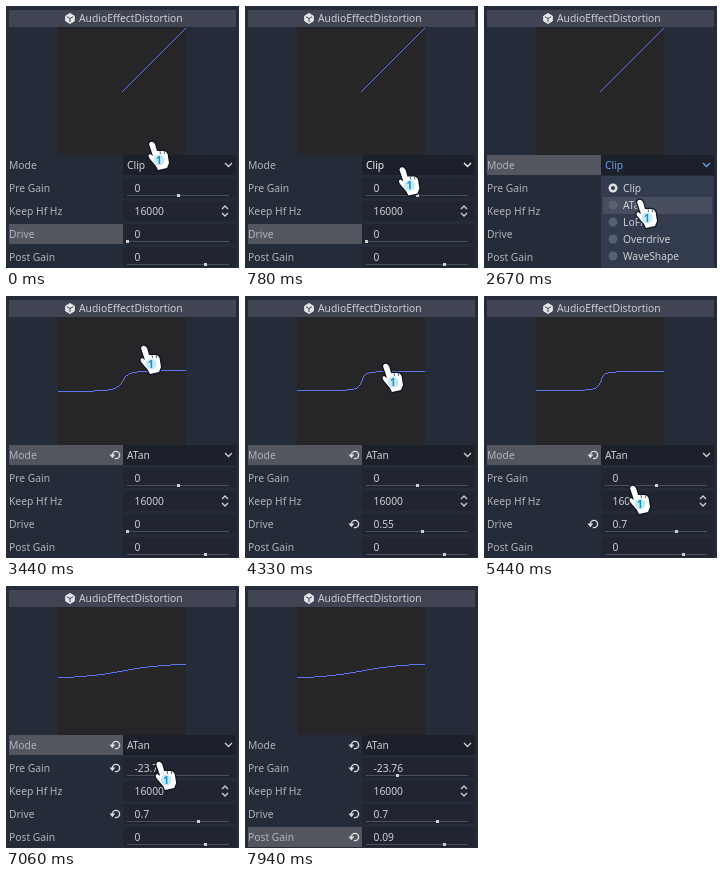
Write an HTML page with a canvas that moves like this. It is 233 px wide and 262 px high and loops after 8 s.

```html
<!DOCTYPE html>
<html lang="en">
<head>
<meta charset="utf-8">
<title>Distortion inspector</title>
<style>
html, body { margin: 0; width: 100%; height: 100%; overflow: hidden; background: #252c39; }
canvas { display: block; }
</style>
</head>
<body>
<canvas id="stage" width="233" height="262"></canvas>
<script>
const ctx = document.getElementById('stage').getContext('2d');
const LOOP = 8000;
const FONT = '"Noto Sans", sans-serif';
const TEXT = '#cdcfd2', LABEL = '#b0b3b8', ACCENT = '#699ce8', FIELD = '#202531';
const MODES = ['Clip', 'ATan', 'LoFi', 'Overdrive', 'WaveShape'];
const HAND = new Path2D('M-3 1Q-2-2 1-1L3 1 5 8 12 8Q16 9 16 14L17 20 15 25 6 27 4 23-2 16Q-5 12-2 11L1 13Z');

const OPEN = 1720, PICK = 2700, RELEASE = 7720;
const DRAG = [5670, 7000];

// Each move: start, end, target values.
const CURSOR = [
  [60, 220, 154, 148], [440, 890, 158, 165], [1110, 1220, 151, 160],
  [2060, 2440, 156, 195], [PICK, 3150, 150, 229], [3260, 3261, 138, 51],
  [3500, 4280, 141, 69], [4390, 4800, 206, 231], [4800, 5110, 178, 231],
  [5170, 5440, 149, 191], [5500, DRAG[0], 172, 188], [6330, 6440, 152, 175],
  [DRAG[1], 7560, 187, 235]
];
const PRE = [[5830, 6280, 36.83], [6330, 6440, -18], [6670, 6830, -23.76]];
const DRIVE = [[3500, 4280, .55], [4390, 4650, .7]];
const POST = [[RELEASE, 7880, .09]];

// Carries the starting values through every move begun by time t.
function glide(t, from, moves) {
  return moves.reduce((now, [start, end, ...to]) => {
    const p = Math.min(1, Math.max(0, (t - start) / (end - start)));
    const e = p * p * (3 - 2 * p);
    return now.map((v, i) => v + (to[i] - v) * e);
  }, from);
}

const sliderX = (value, min, max) => 121.5 + 101 * (value - min) / (max - min);

function rect(x, y, w, h, color) {
  ctx.fillStyle = color;
  ctx.fillRect(x, y, w, h);
}

function text(s, x, y, color = TEXT, font = '10.3px') {
  ctx.font = `${font} ${FONT}`;
  ctx.fillStyle = color;
  ctx.fillText(s, x, y);
}

function line(points, color, width = 1) {
  ctx.beginPath();
  points.forEach(p => ctx.lineTo(...p));
  ctx.strokeStyle = color;
  ctx.lineWidth = width;
  ctx.stroke();
}

function disc(x, y, r, color) {
  ctx.beginPath();
  ctx.arc(x, y, r, 0, 7);
  ctx.fillStyle = color;
  ctx.fill();
}

function drawHeader() {
  rect(3, 4, 227, 17, '#404453');
  const corner = (r, n) => [64 + r * Math.sin(n * Math.PI / 3), 12.5 - r * Math.cos(n * Math.PI / 3)];
  ctx.beginPath();
  for (let n = 0; n < 6; n++) ctx.lineTo(...corner(5, n));
  ctx.closePath();
  ctx.fillStyle = ctx.strokeStyle = '#e4e5e8';
  ctx.lineWidth = 1;
  ctx.lineJoin = 'round';
  ctx.fill();
  ctx.stroke();
  for (const n of [1, 3, 5]) line([[64, 12.5], corner(3.6, n)], '#404453');
  text('AudioEffectDistortion', 73, 16);
}

// Plots f for x in [from, 1] as crisp one-pixel columns.
function plot(f, from) {
  const row = x => Math.floor(85 - 64 * f(x / 64));
  let last = row(from * 64);
  for (let x = from * 64; x < 64; x++) {
    const y = row(x);
    const top = y < last ? y : Math.min(y, last);
    rect(116 + x, top, 1, Math.max(1, last - y), '#5b74f8');
    last = y;
  }
}

function drawPlot(atan, pre, drive, post) {
  rect(52, 21, 128, 128, '#262528');
  if (!atan) return plot(x => x, 0);
  const d = .63 + .1 * drive;
  const mult = 10 ** (d * d * 3) - .999;
  const scale = 10 ** (post / 20) / (Math.atan(mult) * (1 + d * 8));
  const gain = mult * 10 ** (pre / 20);
  plot(x => Math.atan(x * gain) * scale, -1);
}

function drawReset(y) {
  ctx.beginPath();
  ctx.arc(110, y, 3.6, Math.PI, Math.PI * 2.6);
  ctx.strokeStyle = '#dcdee0';
  ctx.lineWidth = 1.4;
  ctx.stroke();
  ctx.beginPath();
  ctx.moveTo(103.5, y - .5);
  ctx.lineTo(109.3, y - .5);
  ctx.lineTo(106.4, y + 3.3);
  ctx.fillStyle = '#dcdee0';
  ctx.fill();
}

function drawRow(label, y, selected, changed, field = FIELD) {
  if (selected) rect(3, y - 10, 114, 20, '#53565f');
  rect(117, y - 10, 113, 20, field);
  text(label, 3, y + 4, LABEL);
  if (changed) drawReset(y);
}

function drawSlider(label, y, value, min, max, selected, grabbed) {
  drawRow(label, y, selected, Math.abs(value) > .005);
  text(String(+value.toFixed(2)), 128.5, y + 4);
  rect(121, y + 7, 102, 1, '#4b505b');
  const x = sliderX(value, min, max);
  if (grabbed) disc(x, y + 7.5, 4, '#e0e0e0');
  else rect(Math.round(x - 1.5), y + 6, 3, 3, TEXT);
}

function drawPopup(hover) {
  rect(117, 170, 113, 92, '#333b4f');
  MODES.forEach((name, i) => {
    const y = 182 + 17 * i;
    if (i === hover) rect(119, y - 8, 109, 17, '#474e60');
    disc(129, y, 4.5, i ? '#596072' : '#e0e0e0');
    if (!i) disc(129, y, 2, '#333b4f');
    text(name, 139, y + 4);
  });
}

function drawCursor(x, y) {
  ctx.save();
  ctx.translate(x, y);
  ctx.lineJoin = 'round';
  ctx.lineWidth = 2.4;
  ctx.strokeStyle = '#10141c';
  ctx.stroke(HAND);
  ctx.fillStyle = '#fff';
  ctx.fill(HAND);
  for (const n of [8, 12]) line([[n, 8], [n + .5, 11]], '#59626e');
  disc(7, 17, 5.5, '#c4eaf6');
  text('1', 4, 21, '#1590c4', 'bold 10px');
  ctx.restore();
}

function draw(t) {
  const atan = t >= PICK, open = t >= OPEN && !atan, released = t >= RELEASE;
  const [pre] = glide(t, [0], PRE), [drive] = glide(t, [0], DRIVE), [post] = glide(t, [0], POST);
  const dragging = t > DRAG[0] && t < DRAG[1];
  const [cx, y] = glide(t, [146, 137], CURSOR);
  const x = dragging ? sliderX(pre, -60, 60) : cx;

  rect(0, 0, 233, 262, '#252c39');
  drawHeader();
  drawPlot(atan, pre, drive, post);

  drawRow('Mode', 159, t >= OPEN && !released, atan, '#1c202b');
  const tone = open ? ACCENT : t > 650 && !atan ? '#f0f1f2' : TEXT;
  text(MODES[+atan], 121, 163, tone);
  line([[219, 157], [222.5, 160.5], [226, 157]], tone, 1.4);

  drawSlider('Pre Gain', 182, pre, -60, 60, false, dragging);

  drawRow('Keep Hf Hz', 205, false, false);
  text('16000', 128.5, 209);
  for (const s of [-1, 1]) {
    line([[216, 205 + 2 * s], [219, 205 + 5 * s], [222, 205 + 2 * s]], TEXT, 1.4);
  }

  drawSlider('Drive', 228, drive, 0, 1, t < OPEN);
  drawSlider('Post Gain', 251, post, -80, 24, released);

  if (open) drawPopup(y < 174 ? -1 : y < 190 ? 0 : 1);
  if (!released) drawCursor(x, y);
}

function tick() {
  draw(performance.now() % LOOP);
  requestAnimationFrame(tick);
}
tick();
</script>
</body>
</html>
```
